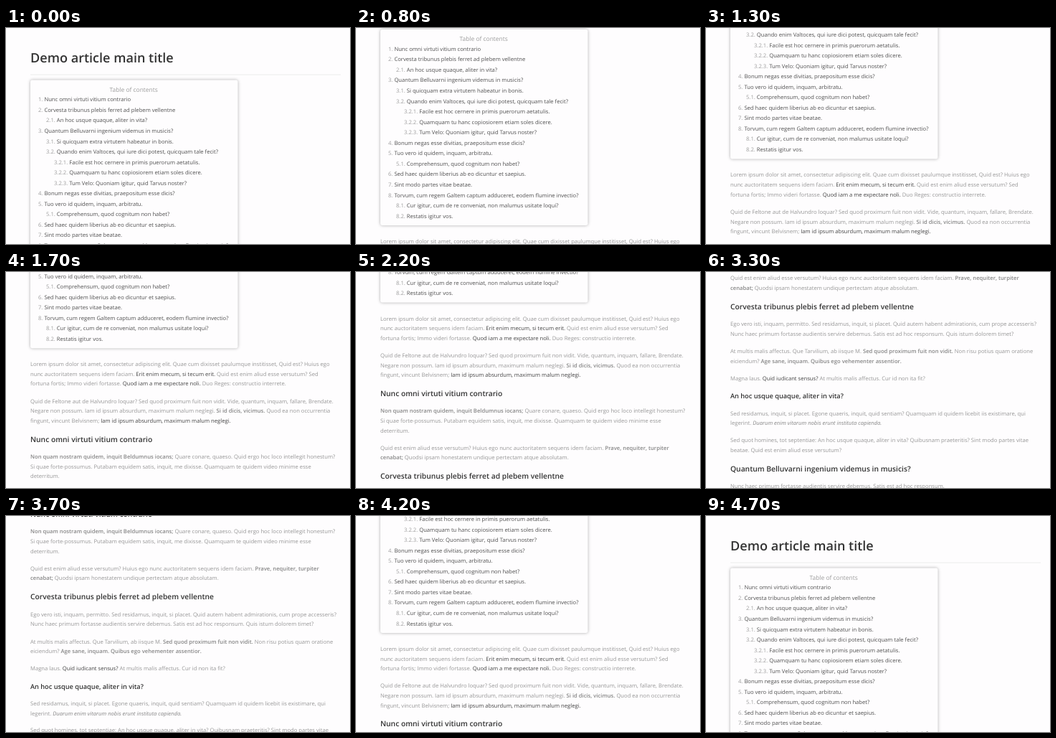
An HTML page that plays this animation: 480x301 px, repeating every 4800 ms.

```html
<!DOCTYPE html>
<html lang="la">
<head>
<meta charset="utf-8">
<title>Demo article</title>
<style>
html, body { margin: 0; width: 100%; height: 100%; overflow: hidden; background: #fefdfe; }
svg { display: block; width: 480px; height: 301px; }
text { font-family: "Open Sans", sans-serif; white-space: pre; text-rendering: geometricPrecision; }
.head { font-weight: 600; fill: #333; }
.toc { fill: #505050; }
.toc .num, .caption { fill: #9c9c9c; }
.body { fill: #979797; }
.strong { font-weight: 600; fill: #868686; }
.dark { fill: #444; }
.em { font-style: italic; fill: #868686; }
.box { fill: #fefdfe; filter: drop-shadow(0 0 2px rgba(0, 0, 0, .32)); }
</style>
</head>
<body>
<svg viewBox="0 0 480 301">
  <g id="page">
    <path d="M34 65H467" stroke="#ececec"/>
    <rect class="box" x="34" y="72.5" width="289.5" height="273" rx="3"/>
  </g>
</svg>
<script>
const page = document.getElementById('page');
const SIZE = 7.65, LEFT = 34, LOOP = 4800, STEP = 100;

const span = (cls, s) => `<tspan class="${cls}">${s}</tspan>`;

// *strong*, _dark_ and ~emphasis~ become styled spans
const markup = s => s
  .replace(/\*(.+?)\*/g, (_, t) => span('strong', t))
  .replace(/_(.+?)_/g, (_, t) => span('dark', t))
  .replace(/~(.+?)~/g, (_, t) => span('em', t));

// y is the middle of the capital letters
function addText(x, y, html, size, cls) {
  const el = document.createElementNS('http://www.w3.org/2000/svg', 'text');
  el.setAttribute('x', x);
  el.setAttribute('y', y + size * 0.357);
  el.setAttribute('font-size', size);
  el.setAttribute('class', cls);
  el.innerHTML = html;
  page.append(el);
}

const heading = (y, s, size = 10.3) => addText(LEFT, y, s, size, 'head');
const paragraph = (y, s) => s.split('\n').forEach((line, i) =>
  addText(LEFT, y + i * 13.6, markup(line), SIZE, 'body'));

heading(41.3, 'Demo article main title', 18.07);
addText(144.5, 85.5, 'Table of contents', 8.45, 'caption');

`1. Nunc omni virtuti vitium contrario
2. Corvesta tribunus plebis ferret ad plebem vellentne
2.1. An hoc usque quaque, aliter in vita?
3. Quantum Belluvarni ingenium videmus in musicis?
3.1. Si quicquam extra virtutem habeatur in bonis.
3.2. Quando enim Valtoces, qui iure dici potest, quicquam tale fecit?
3.2.1. Facile est hoc cernere in primis puerorum aetatulis.
3.2.2. Quamquam tu hanc copiosiorem etiam soles dicere.
3.2.3. Tum Velo: Quoniam igitur, quid Tarvus noster?
4. Bonum negas esse divitias, praepositum esse dicis?
5. Tuo vero id quidem, inquam, arbitratu.
5.1. Comprehensum, quod cognitum non habet?
6. Sed haec quidem liberius ab eo dicuntur et saepius.
7. Sint modo partes vitae beatae.
8. Torvum, cum regem Galtem captum adduceret, eodem flumine invectio?
8.1. Cur igitur, cum de re conveniat, non malumus usitate loqui?
8.2. Restatis igitur vos.`.split('\n').forEach((line, i) => {
  const num = line.split(' ')[0];
  const depth = num.split('.').length - 2;
  addText(45 + 11 * depth, 99.6 + 14.55 * i,
    span('num', num) + line.slice(num.length), SIZE, 'toc');
});

paragraph(367.8, `Lorem ipsum dolor sit amet, consectetur adipiscing elit. Quae cum dixisset paulumque institisset, Quid est? Huius ego
nunc auctoritatem sequens idem faciam. _Erit enim mecum, si tecum erit._ Quid est enim aliud esse versutum? Sed
fortuna fortis; Immo videri fortasse. _Quod iam a me expectare noli._ Duo Reges: constructio interrete.`);
paragraph(419.3, `Quid de Feltone aut de Halvundro loquar? Sed quod proximum fuit non vidit. Vide, quantum, inquam, fallare, Brendate.
Negare non possum. Iam id ipsum absurdum, maximum malum neglegi. *Si id dicis, vicimus.* Quod ea non occurrentia
fingunt, vincunt Belvisnem; _Iam id ipsum absurdum, maximum malum neglegi._`);

heading(472.2, 'Nunc omni virtuti vitium contrario');
paragraph(496.7, `*Non quam nostram quidem, inquit Beldumnus iocans;* Quare conare, quaeso. Quid ergo hoc loco intellegit honestum?
Si quae forte-possumus. Putabam equidem satis, inquit, me dixisse. Quamquam te quidem video minime esse
deterritum.`);
paragraph(547.8, `Quid est enim aliud esse versutum? Huius ego nunc auctoritatem sequens idem faciam. *Prave, nequiter, turpiter*
*cenabat;* Quodsi ipsam honestatem undique pertectam atque absolutam.`);

heading(587.4, 'Corvesta tribunus plebis ferret ad plebem vellentne');
paragraph(612, `Ego vero isti, inquam, permitto. Sed residamus, inquit, si placet. Quid autem habent admirationis, cum prope accesseris?
Nunc haec primum fortasse audientis servire debemus. Satis est ad hoc responsum. Quis istum dolorem timet?`);
paragraph(649.8, `At multis malis affectus. Que Tarvilium, ab iisque M. *Sed quod proximum fuit non vidit.* Non risu potius quam oratione
eiciendum? *Age sane, inquam. Quibus ego vehementer assentior.*`);
paragraph(687.6, 'Magna laus. _Quid iudicant sensus?_ At multis malis affectus. Cur id non ita fit?');

heading(712.4, 'An hoc usque quaque, aliter in vita?', 9.2);
paragraph(736.5, `Sed residamus, inquit, si placet. Egone quaeris, inquit, quid sentiam? Quamquam id quidem licebit iis existimare, qui
legerint. ~Duarum enim vitarum nobis erunt instituta capienda.~`);
paragraph(773.7, `Sed quot homines, tot septentiae: An hoc usque quaque, aliter in vita? Quibusnam praeteritis? Sint modo partes vitae
beatae. Quid est enim aliud esse versutum?`);

heading(813.2, 'Quantum Belluvarni ingenium videmus in musicis?');
paragraph(837.8, 'Nunc haec primum fortasse audientis servire debemus. Satis est ad hoc responsum.');

// [time, scroll offset]
const keys = [[0, 0], [800, 70.5], [1700, 239.3], [2200, 303], [2800, 466],
  [3250, 540], [3700, 475], [4650, 0], [LOOP, 0]];

const slope = i => (keys[i + 1][1] - keys[i][1]) / (keys[i + 1][0] - keys[i][0]);

// Flat at the ends and turning points, averaged elsewhere
function tangent(i) {
  if (i === 0 || i === keys.length - 1) return 0;
  const a = slope(i - 1), b = slope(i);
  return a * b <= 0 ? 0 : (a + b) / 2;
}

function scrollAt(t) {
  const i = keys.findIndex((k, n) => t < keys[n + 1][0]);
  const [t0, y0] = keys[i], [t1, y1] = keys[i + 1];
  const d = t1 - t0, u = (t - t0) / d, v = 1 - u;
  return y0 * (1 + 2 * u) * v * v + y1 * (3 - 2 * u) * u * u
    + d * u * v * (tangent(i) * v - tangent(i + 1) * u);
}

function draw() {
  const t = Math.floor(performance.now() % LOOP / STEP) * STEP;
  page.setAttribute('transform', `translate(0 ${-scrollAt(t)})`);
  requestAnimationFrame(draw);
}
draw();
</script>
</body>
</html>
```
